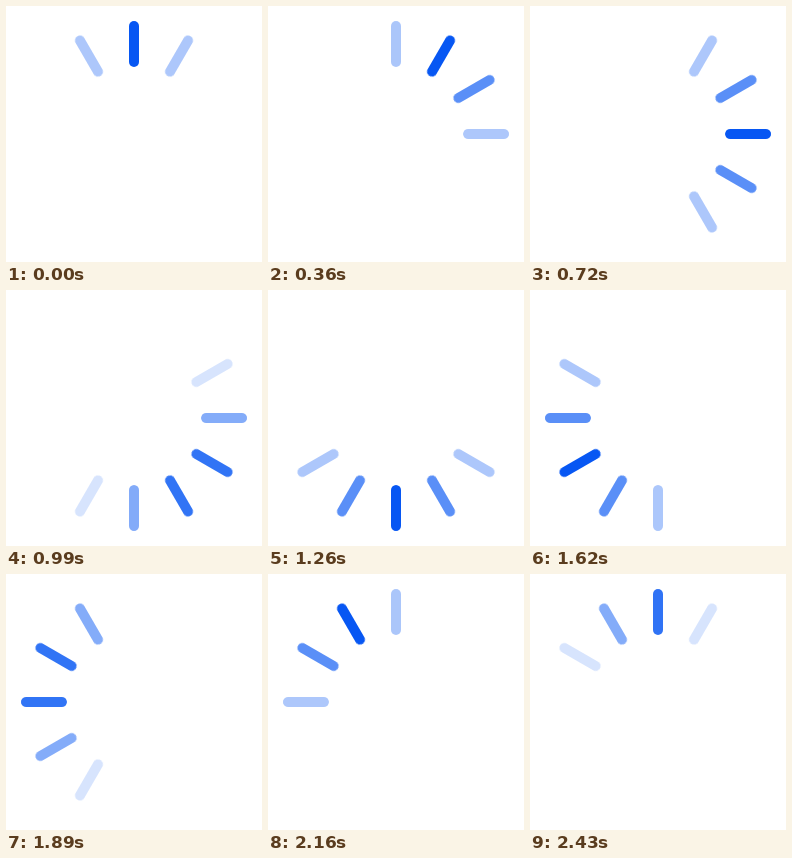
Recreate the animation shown at these times as an HTML page. Size 256x256 px, loop 2520 ms.

```html
<!DOCTYPE html>
<html lang="en">
<head>
<meta charset="utf-8">
<title>Loading spinner</title>
<style>
  html, body { margin: 0; width: 100%; height: 100%; overflow: hidden; background: #fff; }
  svg { display: block; width: 100vw; height: 100vh; }
  line { stroke: #0757f3; stroke-width: 10; stroke-linecap: round; opacity: 0; }
</style>
</head>
<body>
<svg id="spinner" viewBox="-128 -128 256 256"></svg>
<script>
  const TICK = 90;
  const LOOP = 28 * TICK;
  const FADE = 6;
  const BARS = 12;
  const LEAD = 1; // keeps tick boundaries clear of rounding
  const spinner = document.getElementById('spinner');

  // Each bar fades in and out in six equal ticks.
  const edge = FADE * TICK / LOOP;
  const easing = `steps(${FADE})`;
  const pulse = [
    { offset: 0, opacity: 0, easing },
    { offset: edge, opacity: 1, easing },
    { offset: 2 * edge, opacity: 0 },
    { offset: 1, opacity: 0 }
  ];

  // The top bar peaks at the loop start, with a longer gap before the next one.
  const peakTick = i => i === 0 ? 0 : 2 + 2 * i;

  function addBar(i) {
    const bar = document.createElementNS('http://www.w3.org/2000/svg', 'line');
    bar.setAttribute('y1', -108);
    bar.setAttribute('y2', -72);
    bar.setAttribute('transform', `rotate(${i * 360 / BARS})`);
    spinner.append(bar);
    return bar.animate(pulse, {
      duration: LOOP,
      iterations: Infinity,
      delay: (peakTick(i) - FADE) * TICK - LOOP - LEAD
    });
  }

  const now = document.timeline.currentTime || 0;
  for (let i = 0; i < BARS; i++) {
    addBar(i).startTime = now;
  }
</script>
</body>
</html>
```
